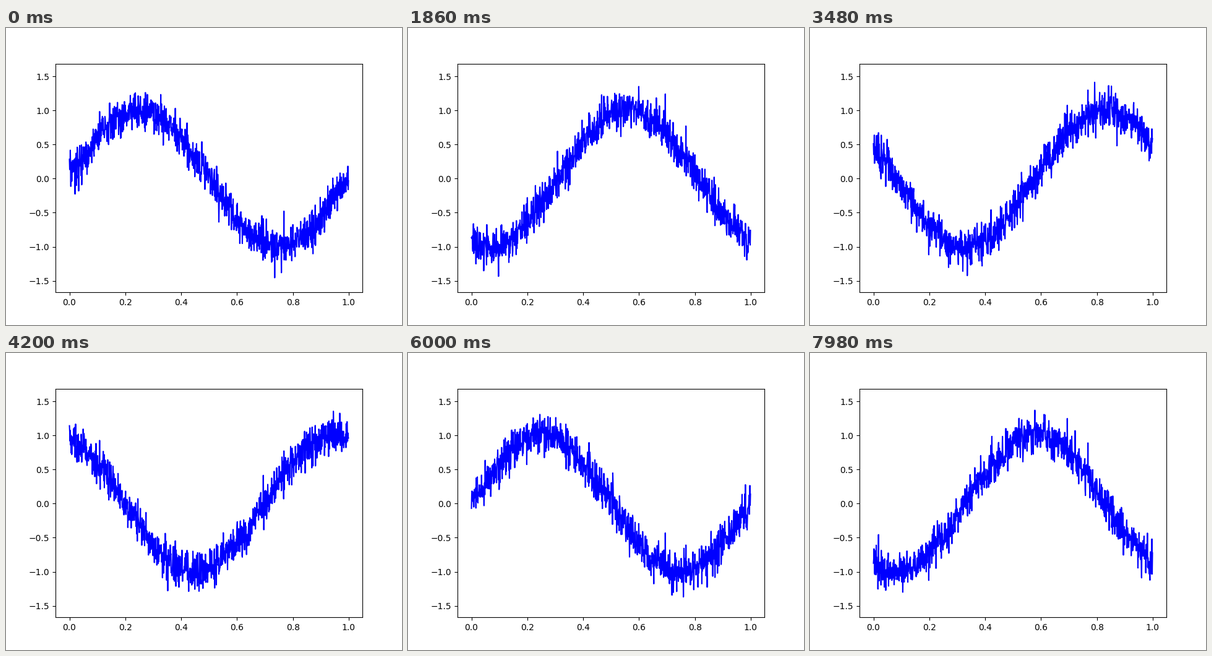
These frames come from a looping animation (640x480 px, 8000 ms). A matplotlib script:

```python
import numpy as np
import matplotlib.pyplot as plt
from matplotlib.animation import FuncAnimation

TICK_MS = 20
TICKS_PER_STEP = 3      # the curve is redrawn every 60 ms
LOOP_MS = 8000
SHIFT = 0.01            # phase moved per redraw, in wavelengths
NOISE = 0.1

x = np.arange(0, 1, 0.001)


def noise(seed):
    return NOISE * np.random.RandomState(seed).randn(x.size)


standing = noise(19680801)  # keeps its place while the sine moves on


def wave(step):
    return np.sin(2 * np.pi * (x - SHIFT * step)) + standing + noise(step)


fig, ax = plt.subplots(figsize=(6.4, 4.8), dpi=100)
line, = ax.plot(x, wave(0), color="blue", lw=1.5)
ax.set_ylim(-1.6684, 1.6856)


def update(tick):
    line.set_ydata(wave(tick // TICKS_PER_STEP))
    return line,


anim = FuncAnimation(fig, update, frames=LOOP_MS // TICK_MS,
                     init_func=lambda: update(0), interval=TICK_MS,
                     repeat=True, repeat_delay=0, blit=False)
plt.show()
```
